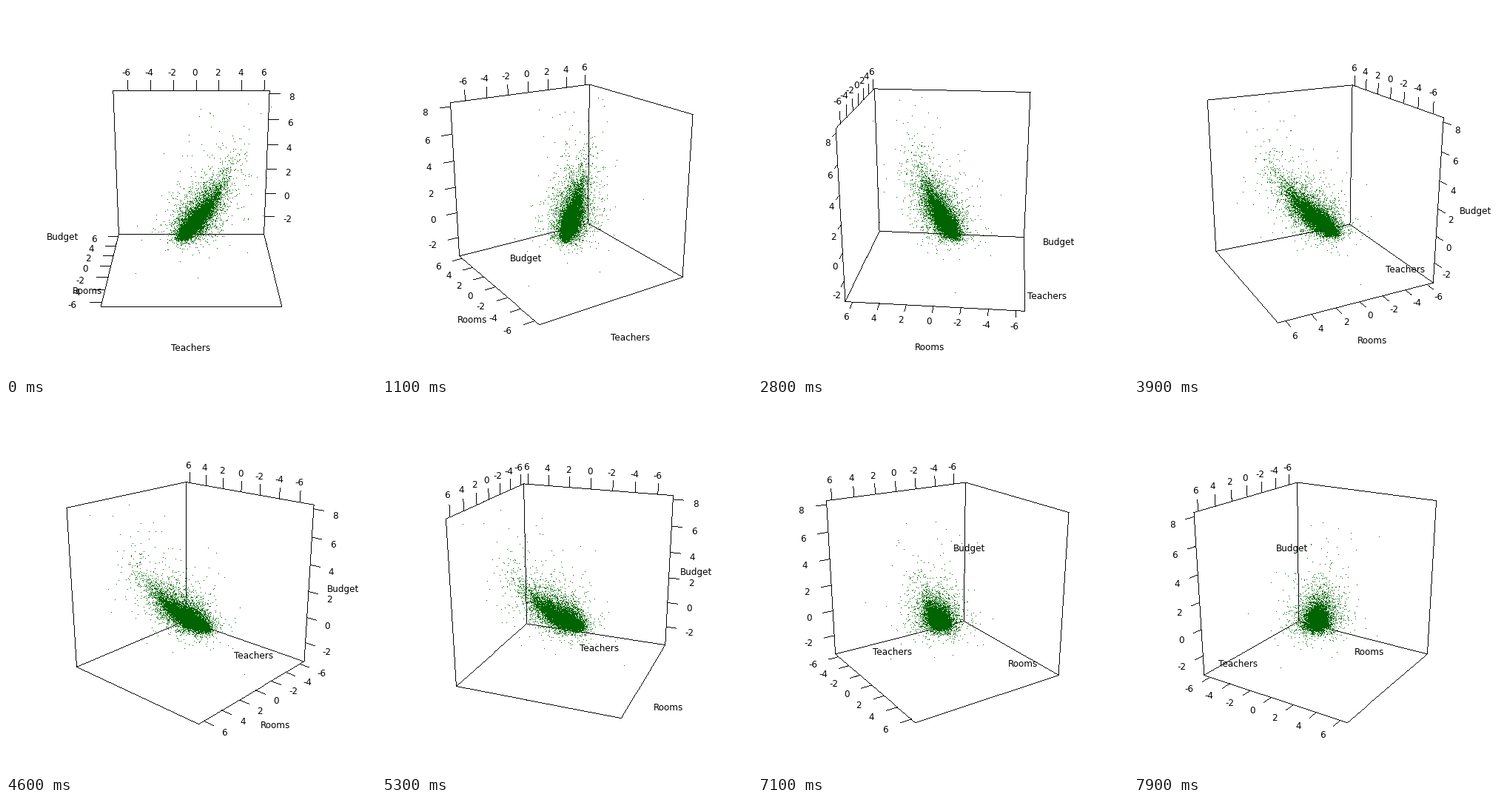
A matplotlib script that plays this animation: 500x500 px, repeating every 8 s.

```python
import numpy as np
import matplotlib.pyplot as plt
from matplotlib.animation import FuncAnimation

SIZE, FRAMES, STEP = 500, 80, 3            # pixels, frames, degrees per frame
TILT = np.radians(20)
CT, ST = np.cos(TILT), np.sin(TILT)
FOCAL, DIST = SIZE / 2 / np.tan(np.radians(15)), 8.23
SCALE = np.array([0.145, 0.1517, 0.16925])  # data units to the unit cube
ZERO = np.array([0.0615, 0.0043, -0.4015])
MARK, TITLE = 2 / 15, 1.3
TICKS = [range(-6, 7, 2), range(-6, 7, 2), range(-2, 9, 2)]
DROP = 7.3                                  # anchor to text baseline


def make_cloud(n=13000):
    """Skewed common factor plus noise that fans out along it."""
    rng = np.random.default_rng(7)
    f = (rng.gamma(4, size=n) - 4) / 2
    spread = 0.3 * np.exp(0.65 * rng.normal(size=n) + 0.2 * f)
    e = rng.normal(size=(3, n)) * spread
    e[2] *= np.where(e[2] < 0, 0.5, 1.3)
    data = np.column_stack([0.8 * f + e[0],
                            0.65 * f + e[1],
                            0.6 * f + 0.09 * (f * f - 1) + e[2]])
    data = np.vstack([data, (4.27, 2.2, 8.12), (-5.04, -1.4, -3.5)])
    cube = data * SCALE + ZERO
    return cube[(np.abs(cube) <= 1).all(axis=1)]


def project(p, c, s):
    """Spin about the vertical axis, tilt, and apply perspective."""
    x, y, z = np.asarray(p, float).T
    across, back = c * x - s * y, s * x + c * y
    k = FOCAL / (DIST + CT * back - ST * z)
    return np.column_stack([SIZE / 2 + k * across,
                            SIZE / 2 - k * (CT * z + ST * back)])


def raster(path):
    """One-pixel-wide points along a polyline."""
    parts = []
    for a, b in zip(path[:-1], path[1:]):
        steps = int(np.ceil(np.abs(b - a).max())) + 1
        parts.append(np.linspace(a, b, steps))
    return np.vstack(parts)


def wall(axis, side):
    """Closed outline of one cube face."""
    ring = [(-1, -1), (1, -1), (1, 1), (-1, 1), (-1, -1)]
    return [np.insert(np.array(q, float), axis, side) for q in ring]


def tick_edges(c, s):
    """For each axis: a point on its edge and the direction of its ticks."""
    wx = 1 if s > 0 else -1
    wy = 1 if c > 0 else -1
    top = s != 0 and abs(s) * CT < ST
    ex = wx if top or s == 0 else -wx
    up = (0, 0, 1)
    return [((0, wy, 1), up),
            ((ex, 0, 1 if top else -1), up if top else (ex, 0, 0)),
            ((-wx, wy, 0), (-wx, 0, 0))]


cloud = make_cloud()

fig = plt.figure(figsize=(5, 5), dpi=100, facecolor="white")
ax = fig.add_axes([0, 0, 1, 1])
ax.set(xlim=(0, SIZE), ylim=(SIZE, 0))
ax.axis("off")

lines, = ax.plot([], [], ",", color="black", zorder=1)
dots, = ax.plot([], [], ",", color="#006400", zorder=2)


def label(text):
    return ax.text(0, 0, text, family="DejaVu Sans", fontsize=8.64,
                   ha="center", va="baseline", zorder=3)


titles = [label(t) for t in ("Teachers", "Rooms", "Budget")]
numbers = [[label(str(v)) for v in ticks] for ticks in TICKS]
title_pos = -TITLE * (1 - np.eye(3))


def update(i):
    a = np.radians(STEP * i)
    c, s = np.cos(a), np.sin(a)

    faces = [wall(2, -1), wall(1, 1 if c > 0 else -1)]
    if s != 0:
        faces.append(wall(0, 1 if s > 0 else -1))
    paths = [project(f, c, s) for f in faces]

    for axis, (edge, out) in enumerate(tick_edges(c, s)):
        out = np.array(out, float)
        lean = c * out[0]
        ha = "left" if lean > 0.5 else "right" if lean < -0.5 else "center"
        for v, txt in zip(TICKS[axis], numbers[axis]):
            p = np.array(edge, float)
            p[axis] = ZERO[axis] + SCALE[axis] * v
            q = project([p, p + MARK * out, p + 2 * MARK * out], c, s)
            paths.append(q[:2])
            txt.set_position((q[2, 0] - 1.5, q[2, 1] + DROP))
            txt.set_ha(ha)

    for txt, (x, y) in zip(titles, project(title_pos, c, s)):
        txt.set_position((x - 0.5, y + DROP))

    lines.set_data(*np.vstack([raster(p) for p in paths]).T)
    dots.set_data(*project(cloud, c, s).T)
    return [lines, dots, *titles, *sum(numbers, [])]


anim = FuncAnimation(fig, update, frames=FRAMES, interval=100,
                     repeat=True, repeat_delay=0, blit=False)
plt.show()
```
